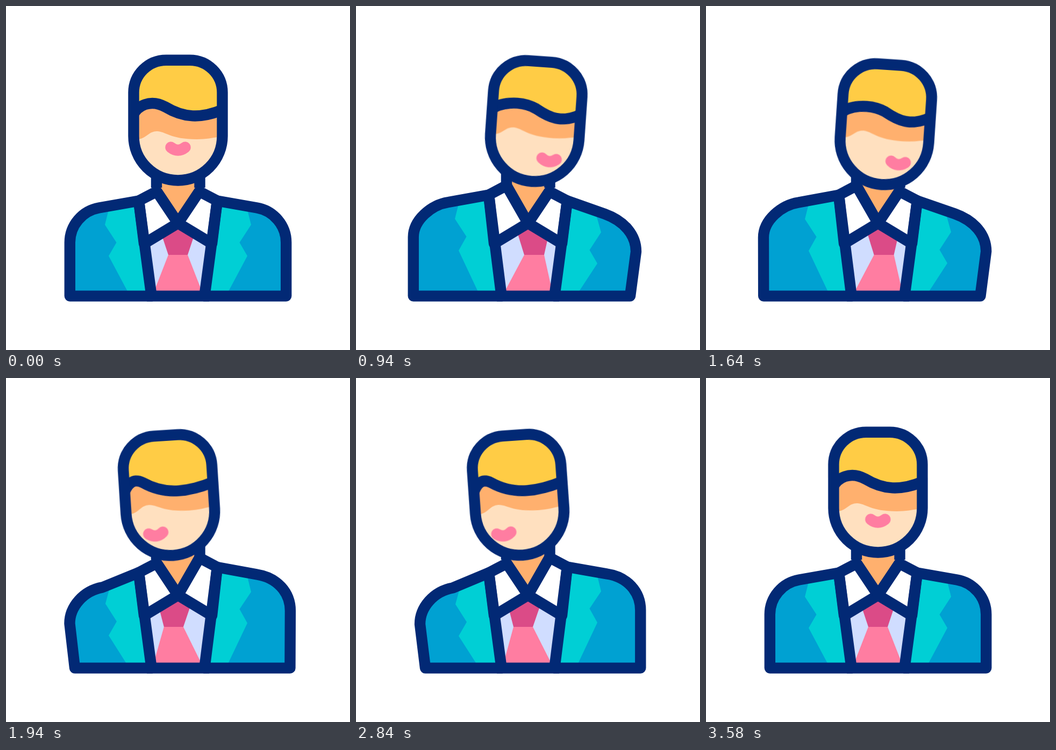
An HTML page for the animation above (3600 ms loop, 640 by 640 pixels).

```html
<!DOCTYPE html>
<html lang="en">
<head>
<meta charset="utf-8">
<title>Businessman looking around</title>
<style>
  html, body { margin: 0; width: 100%; height: 100%; overflow: hidden; background: #fff; }
  svg { display: block; width: 100vw; height: 100vh; }

  .line { fill: none; stroke: #022975; stroke-width: 20.4; stroke-linejoin: round; }
  .skin { fill: #ffe0bf; }
  .shade { fill: #ffb06e; }
  .hair { fill: #ffcc45; }
  .coat { fill: #00a1d2; }
  .lapel { fill: #00cfd5; }
  .shirt { fill: #d0ddff; }
  .collar { fill: #fff; }
  .tie { fill: #ff7da1; }
  .knot { fill: #db4b87; }
  .mouth { fill: none; stroke: #ff7da1; stroke-width: 21; stroke-linecap: round; }

  /* --c, --r, --l: centre, right and left pose */
  .morph { animation: morph 3.6s ease-in-out infinite; }
  .move { animation: move 3.6s ease-in-out infinite; }
  .nod { animation: nod 3.6s ease-in-out infinite; }

  #head {
    transform-origin: 320px 242px;
    --c: translate(0px, 0px) rotate(0deg);
    --r: translate(12.5px, 8px) rotate(4deg);
    --l: translate(-15.5px, 5.7px) rotate(-4deg);
  }
  #shade {
    --c: translate(0px, 0px);
    --r: translate(-1px, -6.5px);
    --l: translate(0px, -5px);
  }
  #mouth {
    --c: translate(320px, 263px) rotate(0deg);
    --r: translate(349.5px, 280.3px) rotate(2deg);
    --l: translate(287.7px, 281px) rotate(-4deg);
  }
  #hair {
    --c: path("M200 80L236 204C244 186 268 172 297 188C330 208 362 210 403 193L420 80Z");
    --r: path("M200 80L236 197C246 183 288 174 319 189C343 203 368 214 404 193L420 80Z");
    --l: path("M200 80L236 204C242 190 252 174 271 186C305 208 345 212 403 193L420 80Z");
  }
  #coatL {
    --c: path("M118.8 539.6L118.8 440C118.8 408 142 381 173 375.5L247 362.5L270.7 539.6Z");
    --r: path("M106.7 539.6L106.7 430C106.7 398 140 370 172 365L247 351.5L270.7 539.6Z");
    --l: path("M129 539.6L119 458C119 427 144 397 180 390.5L247 362.5L270.7 539.6Z");
  }
  #lapelL {
    --c: path("M192.5 373L184 407 205.5 440 191 465 231 540 270 540 247 362Z");
    --r: path("M192.5 362L184 396 205.5 429 191 455 231 540 270 540 247 351Z");
    --l: path("M195 384L185 421 206 454 191 480 229.5 540 270 540 247 362Z");
  }
  #coatR {
    --c: path("M521.2 539.6L521.2 440C521.2 408 498 381 467 375.5L393 362.5L369.3 539.6Z");
    --r: path("M510 539.6L521 457C521 426 499 400 463 387L393 362.5L369.3 539.6Z");
    --l: path("M529.3 539.6L529.3 432C529.3 397 504 370 467 364.5L393 351.5L369.3 539.6Z");
  }
  #lapelR {
    --c: path("M447.5 373L456 407 434.5 440 449 465 409 540 370 540 393 362Z");
    --r: path("M445 382L456 421 434.5 454 449 479 409 540 370 540 393 362Z");
    --l: path("M447.5 362L456 397 434.5 429 449 455 409 540 370 540 393 351Z");
  }
  #collarL {
    --c: path("M247 362.5L280.5 345 320 404 257 442Z");
    --r: path("M247 351.5L280 334 320 404 257 442Z");
    --l: path("M247 362.5L280.5 345 320 404 257 442Z");
  }
  #collarR {
    --c: path("M393 362.5L359.5 345 320 404 383 442Z");
    --r: path("M393 362.5L359.5 345 320 404 383 442Z");
    --l: path("M393 351.5L360 334 320 404 383 442Z");
  }
  #tie {
    --c: path("M302 463L338 463 368 540 272 540Z");
    --r: path("M313 463L350 463 367 540 272 540Z");
    --l: path("M293 463L329 463 368 540 272 540Z");
  }
  #knot {
    --c: path("M282.7 405L357.3 405 338 463 302 463Z");
    --r: path("M295 405L363 405 350 463 313 463Z");
    --l: path("M278 405L349 405 329 463 293 463Z");
  }

  @keyframes morph {
    0%, 100% { d: var(--c); }
    11.1111%, 44.4444% { d: var(--r); }
    55.5556%, 88.8889% { d: var(--l); }
  }
  @keyframes move {
    0%, 100% { transform: var(--c); }
    11.1111%, 44.4444% { transform: var(--r); }
    55.5556%, 88.8889% { transform: var(--l); }
  }
  @keyframes nod {
    0%, 11.1111%, 22.2222%, 33.3333%, 44.4444%,
    55.5556%, 66.6667%, 77.7778%, 88.8889%, 100% { transform: translateY(0px); }
    16.6667%, 27.7778%, 38.8889% { transform: translateY(-7.2px); }
    61.1111%, 72.2222%, 83.3333% { transform: translateY(-4.3px); }
  }
</style>
</head>
<body>
<svg viewBox="0 0 640 640">
  <defs>
    <path id="face" d="M237.5 161A60.5 60.5 0 0 1 298 100.7H342A60.5 60.5 0 0 1 402.5 161V242A82.5 82.5 0 0 1 237.5 242Z"/>
    <clipPath id="inFace"><use href="#face"/></clipPath>
  </defs>

  <path class="shade" d="M280 300H360V345L320 404L280 345Z"/>
  <path class="line" d="M280 300V338M360.5 300V338"/>

  <path class="shirt" d="M257 441L320 404L383 441L370 540H270Z"/>
  <path id="tie" class="tie morph"/>
  <path id="knot" class="knot morph"/>

  <g id="coatL">
    <path class="coat morph"/>
    <path id="lapelL" class="lapel morph"/>
  </g>
  <g id="coatR">
    <path class="coat morph"/>
    <path id="lapelR" class="lapel morph"/>
  </g>
  <path id="collarL" class="line collar morph"/>
  <path id="collarR" class="line collar morph"/>
  <g style="--c:inherit">
    <path class="line" d="M262 539.6H378"/>
  </g>
  <path id="edgeL" class="line morph"/>
  <path id="edgeR" class="line morph"/>
  <style>
    #edgeL {
      --c: path("M118.8 539.6L118.8 440C118.8 408 142 381 173 375.5L247 362.5L270.7 539.6Z");
      --r: path("M106.7 539.6L106.7 430C106.7 398 140 370 172 365L247 351.5L270.7 539.6Z");
      --l: path("M129 539.6L119 458C119 427 144 397 180 390.5L247 362.5L270.7 539.6Z");
    }
    #edgeR {
      --c: path("M521.2 539.6L521.2 440C521.2 408 498 381 467 375.5L393 362.5L369.3 539.6Z");
      --r: path("M510 539.6L521 457C521 426 499 400 463 387L393 362.5L369.3 539.6Z");
      --l: path("M529.3 539.6L529.3 432C529.3 397 504 370 467 364.5L393 351.5L369.3 539.6Z");
    }
  </style>

  <g class="nod">
    <g id="head" class="move">
      <g clip-path="url(#inFace)">
        <use href="#face" class="skin"/>
        <path id="shade" class="shade move" d="M230 160V248H247C262 245 266 233 281 233C296 233 306 248 355 248C372 248 385 245 393 244H410V160Z"/>
        <path id="mouth" class="mouth move" d="M-13.3 0Q0 10.5 13.3 0"/>
        <path id="hair" class="line hair morph"/>
      </g>
      <use href="#face" class="line"/>
    </g>
  </g>
</svg>
</body>
</html>
```
